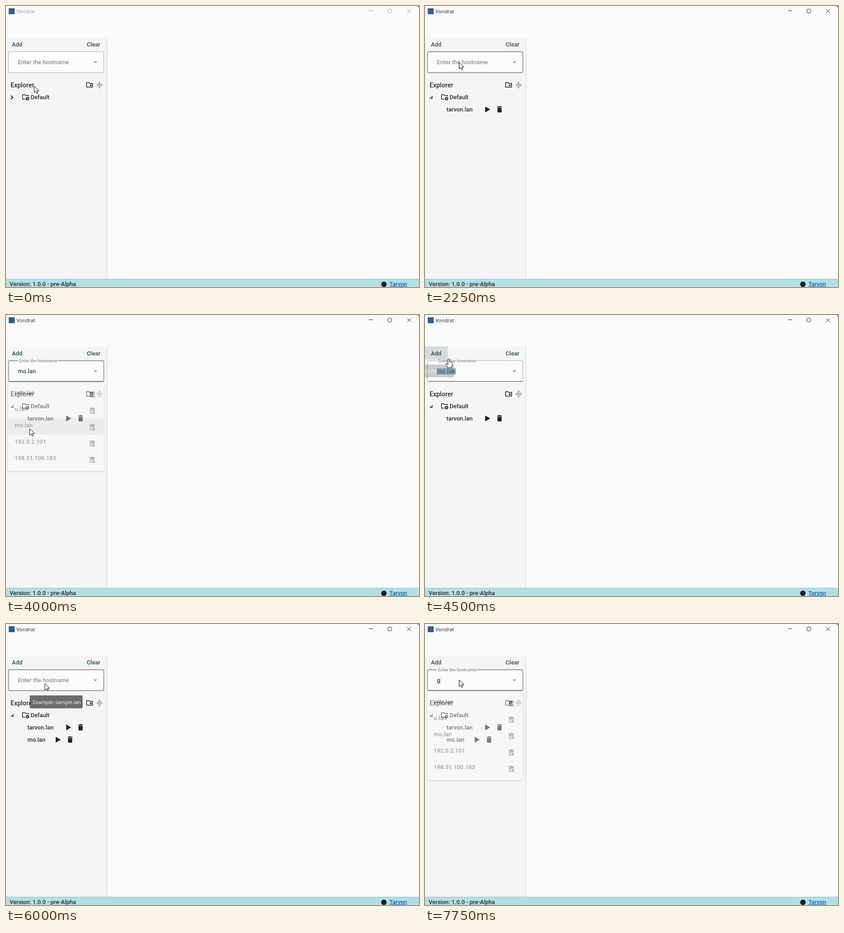
These frames come from a looping animation (906 by 618 pixels, 8 s). An HTML page:

```html
<!DOCTYPE html>
<html lang="en">
<head>
<meta charset="utf-8">
<title>Host list</title>
<style>
  html, body { margin: 0; width: 906px; height: 618px; overflow: hidden; background: #fafafa; }
  svg { display: block; }
  text { font: 500 12.8px Roboto, sans-serif; fill: #2b2b2b; white-space: pre; }
  .ui { font: 400 11px "Open Sans", sans-serif; }
  .action { fill: #2f4f4f; }
  .faint { fill: #909090; }
  .line { fill: none; stroke: #222; stroke-width: 1.5; }
  #menu rect.panel { filter: drop-shadow(0 1px 2px rgba(0, 0, 0, .4)); }
  .tip rect { fill: #616161; }
  .tip text { fill: #fff; }
</style>
</head>
<body>
<svg width="906" height="618" viewBox="0 0 906 618">
  <defs>
    <g id="run">
      <path d="M132 221v13l11-6.5z"/>
      <path d="M158 221.2h3l.8-1.2h3.5l.8 1.2h3v1.6h-11.100zM159 223.800h9.200v8.700q0 1.500-1.500 1.500h-6.200q-1.500 0-1.500-1.500z"/>
    </g>
    <g id="forget" class="line">
      <path d="M4.500 2.800H13M5.500 1.500h4M3.300 5v8.300h7.800M11.300 4v6.500M.8 1.200l12.500 12.600M6 4.800h5"/>
    </g>
    <path id="folder" class="line" d="M.8 11.500V1.500h4.800l1.600 1.700h6.800v2"/>
  </defs>

  <rect width="906" height="618" fill="#fafafa"/>
  <path d="M902 0h4v4q-.5-3.500-4-4" fill="#333"/>

  <rect x="6" y="5" width="13" height="13" fill="#2c5f93"/>
  <g id="title">
    <text class="ui" x="23" y="15.500" style="fill:currentColor">Vondrat</text>
    <path d="M796 10.500h9M880 7l8.500 8.500M888.500 7l-8.500 8.500" stroke="currentColor"/>
    <rect x="838" y="7" width="8" height="8" rx="1.500" fill="none" stroke="currentColor"/>
  </g>

  <rect y="70" width="221" height="530" fill="#f5f5f5"/>
  <rect x="220.500" y="70" width="2" height="530" fill="#e2e2e2"/>

  <rect id="addHover" y="69" width="50" height="29" fill="#d7dbdb"/>
  <text class="action" x="13" y="88.500">Add</text>
  <text class="action" x="177" y="88.500">Clear</text>

  <rect id="field" x="5.500" y="100.500" width="209" height="46" rx="3" fill="#fbfbfb"/>
  <path id="underline" d="M6 145.800h208" stroke="#8c8c8c" stroke-width="1.500"/>
  <text id="placeholder" class="faint" x="26" y="128">Enter the hostname</text>
  <g id="label">
    <rect x="26" y="98" width="88" height="5" fill="#f8f8f8"/>
    <text class="faint" x="28.500" y="104" style="font-size:9.600px">Enter the hostname</text>
  </g>
  <rect id="selection" x="26" y="117" width="42" height="14" fill="#8db9d8"/>
  <text id="value" x="26" y="128"></text>
  <rect id="caret" y="117" width="1" height="14" fill="#d0d0d0"/>
  <path id="arrow" d="M192.500 122h7.500l-3.750 3.800z" fill="#8c8c8c"/>

  <text x="10" y="178.500" style="font-size:14px">Explorer</text>
  <use href="#folder" x="176" y="167"/>
  <path class="line" d="M176.800 178.500h13.200v-7M186 172v5M183.500 174.500h5"/>
  <path d="M199 172.300h12.500M199 175.300h12.500M205.200 166v3M205.200 181.500v-3" stroke="#888" stroke-width="1.400"/>
  <path d="M202.500 168h5.400l-2.700 2.800zM202.500 179.800h5.400l-2.700-2.800z" fill="#888"/>

  <rect id="rowHover" x="28" y="189" width="192" height="24" fill="#dcdcdc"/>
  <path id="chevron" class="line" style="stroke-width:1.900"/>
  <use href="#folder" x="35.500" y="193.500"/>
  <path class="line" d="M36.300 205h6"/>
  <circle cx="47.200" cy="203.800" r="2.300" class="line" style="stroke-width:1.800"/>
  <circle cx="47.200" cy="203.800" r="3.400" class="line" stroke-dasharray="1.700 1.860"/>
  <text x="54" y="205">Default</text>

  <g id="host1" fill="#222">
    <text x="47" y="232">tarvon.lan</text>
    <use href="#run"/>
  </g>
  <g id="host2" fill="#222">
    <text x="47" y="258.500">mo.lan</text>
    <use href="#run" x="-23" y="27"/>
  </g>

  <g id="menu">
    <rect class="panel" x="4.500" y="148" width="210" height="195" rx="3" fill="#fbfbfb"/>
  </g>

  <g id="addTip" class="tip">
    <rect x="-16" y="109" width="80" height="28" rx="2"/>
    <text class="ui" x="24" y="127" text-anchor="middle">Add new host</text>
  </g>
  <g id="hintTip" class="tip">
    <rect x="52" y="157" width="116" height="28.500" rx="2"/>
    <text class="ui" x="58.500" y="175.500">Example: sample.lan</text>
  </g>

  <rect y="600" width="906" height="18" fill="#b0e0e6"/>
  <path d="M0 600.500h906" stroke="#a3bcc0"/>
  <text x="8" y="616">Version: 1.0.0 - pre-Alpha</text>
  <circle cx="829" cy="612" r="6" fill="#1b1f23"/>
  <text x="841" y="616" style="fill:#0b62c4;text-decoration:underline">Tarvon</text>

  <g id="pointer" fill="#fff" stroke="#000" stroke-linejoin="round">
    <path id="cursor" d="M0 0v14.500l3.400-3.100 2.200 5 2.400-1.100-2.200-4.800h4.700z"/>
    <path id="hand" d="M-1.700 1.500c0-2 3.400-2 3.400 0v5l4.800 1.200q2 .6 1.700 2.800l-1 5.500-1 4h-8l-1.500-3-3.200-4.500c-1-1.600 1-2.800 2.300-1.500l2.500 2.200z"/>
  </g>
</svg>
<script>
const LOOP = 8000, STEP = 250, ROW_TOP = 155, ROW = 36;
const HISTORY = ["reta.lan", "u.lan", "mo.lan", "192.0.2.101", "198.51.100.183"];

// Pointer path: time, x, y
const PATH = [
  [0, 62, 176], [500, 62, 150], [1000, 36, 197], [1250, 12, 200], [1500, 18, 209],
  [2000, 80, 130], [2500, 70, 118], [3000, 52, 180], [3250, 47, 219], [3750, 52, 250],
  [4000, 52, 250], [4500, 52, 96], [5000, 52, 96], [5500, 80, 125], [6000, 85, 131],
  [6250, 85, 131], [6500, 82, 200], [6750, 77, 243], [7000, 76, 235], [7500, 75, 123], [8000, 75, 123]
];

const el = id => document.getElementById(id);
const show = (id, opacity) => el(id).setAttribute("opacity", +opacity);
const set = (id, attrs) => { for (const k in attrs) el(id).setAttribute(k, attrs[k]); };

el("menu").innerHTML += HISTORY.map((name, i) => {
  const y = ROW_TOP + i * ROW;
  return `<rect class="row" x="5" y="${y}" width="209" height="${ROW}"/>
    <text x="19" y="${y + 20}">${name}</text><use href="#forget" x="182" y="${y + 12}"/>`;
}).join("");
const rows = document.querySelectorAll(".row");

function pointerAt(t) {
  const i = Math.max(1, PATH.findIndex(p => p[0] >= t));
  const [t0, x0, y0] = PATH[i - 1], [t1, x1, y1] = PATH[i];
  const k = Math.max(0, (t - t0) / (t1 - t0));
  return { x: x0 + (x1 - x0) * k, y: y0 + (y1 - y0) * k };
}

const rowAt = t => Math.floor((pointerAt(t).y - ROW_TOP) / ROW);

function draw(t) {
  const within = (from, to) => t >= from && t < to;
  const { x, y } = pointerAt(t);
  const open = within(2500, 4000) || within(6250, 7750);
  const fading = t === 4000 || t === 7750;
  const floating = within(2500, 5000) || t >= 6250;
  const picked = within(4000, 5000), typed = t >= 7750;
  const overField = x > 5 && x < 215 && y > 100 && y < 147;
  const overAdd = within(4500, 5250);

  el("title").style.color = t < 1500 ? "#999" : "#222";
  show("addHover", overAdd);

  const strong = open || fading || overField;
  set("field", { stroke: strong ? "#969696" : "#ababab", "stroke-width": strong ? 1.8 : 1 });
  show("underline", floating);
  show("label", floating);
  show("placeholder", !floating);
  el("value").textContent = picked ? "mo.lan" : typed ? "g" : "";
  el("value").style.fill = picked ? "#2b4a60" : "#333";
  show("selection", within(4250, 5000));
  const blink = (t - (t < 6250 ? 2500 : 6250)) % 1000;
  show("caret", typed || open && (blink === 0 || blink === 750));
  set("caret", { x: typed ? 33.5 : 26 });
  set("arrow", { transform: open ? "rotate(180 196.25 123.9)" : "" });

  show("rowHover", within(1000, 2250));
  set("chevron", { d: t < 1500 ? "M11 197l4 4-4 4" : "M15.500 198v4.700h-5" });
  show("host1", t < 1500 ? 0 : t === 1500 ? .75 : 1);
  show("host2", t >= 5000);

  show("menu", open ? 1 : fading ? .4 : 0);
  const current = rowAt(t), previous = rowAt(t - STEP);
  rows.forEach((row, i) => row.setAttribute("fill",
    i === current ? "#e0e0e0" : i === previous ? "#f0f0f0" : "#fbfbfb"));

  show("addTip", t === 4500 ? .3 : within(4750, 5250) ? .9 : 0);
  show("hintTip", within(6000, 6250) ? .92 : 0);

  set("pointer", { transform: `translate(${x} ${y})` });
  show("cursor", !overAdd);
  show("hand", overAdd);
}

function frame() {
  const t = performance.now() % LOOP;
  draw(Math.floor(t / STEP) * STEP);
  requestAnimationFrame(frame);
}
frame();
</script>
</body>
</html>
```
